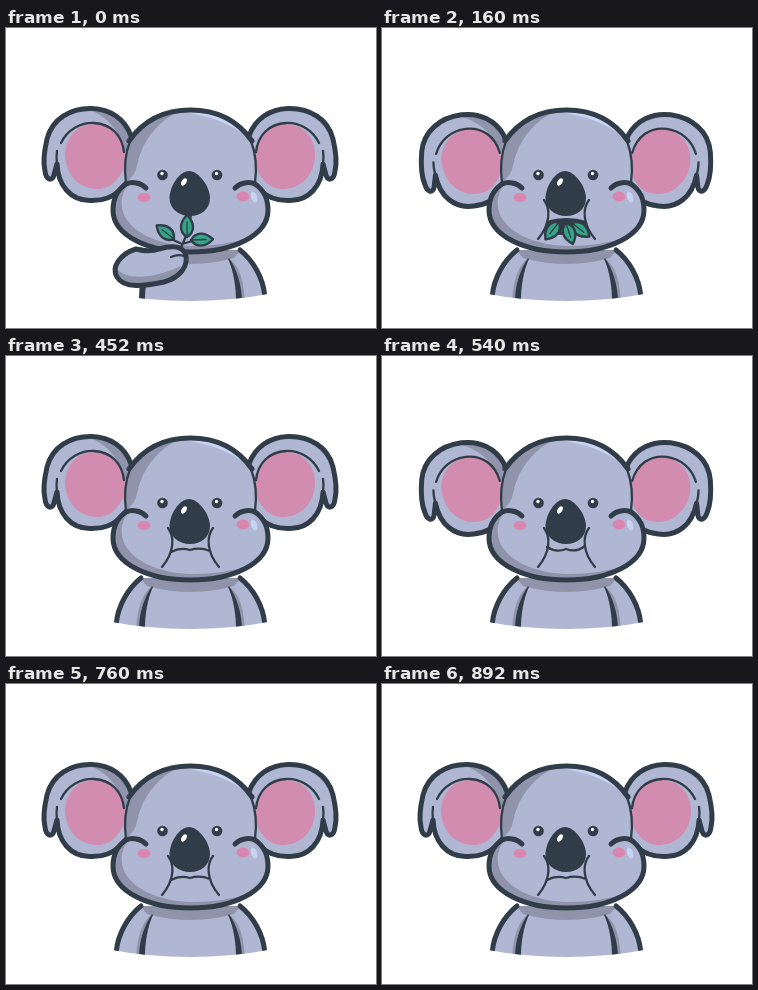
An HTML page that plays this animation: 370 by 300 pixels, repeating every 0.98 s.

```html
<!DOCTYPE html>
<html lang="en">
<head>
<meta charset="utf-8">
<title>Koala eating leaves</title>
<style>
  html, body { margin: 0; width: 100%; height: 100%; overflow: hidden; background: #fff; }
  svg { display: block; width: 370px; height: 300px; }
  .ink { fill: none; stroke: #303d48; stroke-width: 5; stroke-linecap: round; stroke-linejoin: round; }
  .thin { stroke-width: 2.3; }
  .vein { stroke-width: 1.3; }
  .fur { fill: #b0b7d3; }
  .shade { fill: #9094ab; }
  .shine { fill: #c8d2f2; }
  .pink { fill: #d28caf; }
  .blush { fill: #d987b0; }
  .dark { fill: #303d48; }
  .leaf { fill: #35a487; stroke: #303d48; stroke-width: 2.4; stroke-linejoin: round; }
</style>
</head>
<body>
<svg viewBox="0 0 370 300">
  <defs>
    <path id="head" d="M122 114C136 93 158 82 184.500 82C211 82 233 93 247 114C250 128 250 142 249 156C258 162 262 171 262 182C262 208 226 224 184.500 224C143 224 107 208 107 182C107 171 111 162 120 156C118 142 119 128 122 114Z"/>
    <path id="earShape" d="M125 108C119 91 104 81 86 80.500C64 80 46 91 41 111C38 124 37 135 39 143C40 152 46 154 48 147L51 136C52 158 65 172.500 84 172.500C97 173 107 169 114 162L130 145Z"/>
    <clipPath id="inHead"><use href="#head"/></clipPath>
    <clipPath id="bust"><path d="M100 200H268V265Q184 281 100 265Z"/></clipPath>
    <g id="earInside">
      <path class="pink" d="M59 126C60 108 72 96 88 96C105 96 116 107 119 124V138C112 153 104 161 91 161C72 161 59 145 59 126Z"/>
      <path class="ink thin" d="M55 115C61 102 74 94.500 88 95C105 96 116 107 118 124"/>
      <path class="ink thin" d="M51 136Q50 129 51 123"/>
      <use href="#earShape" class="ink"/>
    </g>
    <g id="leaf">
      <path class="leaf" d="M0 0C-8 -5 -8 -14 0 -22C8 -14 8 -5 0 0Z"/>
      <path class="ink vein" d="M0 0V-15"/>
    </g>
    <g id="arm">
      <path class="shade" d="M145 231C135 239 131 255 130 274H137Z"/>
      <path class="dark" d="M146 230C138 242 133 257 133 274H139C139 258 141 244 147 231Z"/>
      <path class="ink" d="M135 222C121 233 112 251 110.500 266"/>
    </g>
    <g id="headSide">
      <path class="ink thin" d="M124 113C119 126 118 140 120 155"/>
      <path class="ink" d="M140 160C135 155 126 153 120 156"/>
    </g>
    <path id="handShape" d="M130 221C114 226 105 239 111 249C118 261 139 258 158 254C173 250 184 238 179 225C175 217 164 218 153 221C145 224 137 223 130 221Z"/>
  </defs>

  <g clip-path="url(#bust)">
    <path class="fur" d="M135 222C121 233 112 251 110 278H259C257 251 248 233 234 222Z"/>
    <path class="shade" d="M134 222H235L228 230Q184 242 141 230Z"/>
    <use href="#arm"/>
    <use href="#arm" transform="matrix(-1 0 0 1 369 0)"/>
  </g>
  <path id="armGap" fill="#fff" d="M98 215H133V280H98Z"/>

  <g id="leftEar">
    <use href="#earShape" class="fur"/>
    <path class="shade" d="M84 82C102 82 117 91 125 108L119 126C116 108 105 90 84 82Z"/>
    <use href="#earInside"/>
  </g>
  <g transform="matrix(-1 0 0 1 368 0)">
    <g id="rightEar">
      <use href="#earShape" class="fur"/>
      <use href="#earInside"/>
    </g>
  </g>

  <use href="#head" class="fur"/>
  <g clip-path="url(#inHead)">
    <path class="shade" d="M110 150L123 156C114 166 113 180 121 192C133 209 158 217 185 218Q220 218 244 209L240 228H100V150Z"/>
    <path class="shade" d="M115 116C128 90 156 82 174 83C152 93 137 112 132 134Q129 149 121 153H114Z"/>
    <path class="shine" d="M176 84C205 80 232 92 247 114C230 98 208 88 176 84Z"/>
  </g>
  <use href="#headSide"/>
  <use href="#headSide" transform="matrix(-1 0 0 1 369 0)"/>
  <path class="ink" d="M123 113C137 93 158 82 184.500 82C211 82 232 93 246 113M249 156C258 162 262 171 262 182C262 208 226 224 184.500 224C143 224 107 208 107 182C107 171 111 162 120 156"/>

  <ellipse class="blush" cx="138" cy="169.500" rx="6.500" ry="4.500"/>
  <ellipse class="blush" cx="237" cy="168.500" rx="6.500" ry="5"/>
  <ellipse class="shine" cx="248" cy="169" rx="3" ry="5.500" transform="rotate(-20 248 169)"/>
  <circle class="dark" cx="156.500" cy="147" r="5.300"/><circle fill="#fff" cx="156" cy="145.500" r="1.700"/>
  <circle class="dark" cx="211" cy="147" r="5.300"/><circle fill="#fff" cx="210.500" cy="145.500" r="1.700"/>

  <path id="cheeks" class="ink thin" d="M162 172C169 181 168 197 156 211M207 172C200 181 201 197 213 211"/>
  <path id="flat" class="ink thin" d="M165 196Q174 191 184 194Q194 191 204 195"/>
  <path id="wavy" class="ink thin" d="M165 191Q174 197 184 193Q194 197 203 190"/>
  <g id="munch">
    <path class="dark" d="M164 193Q184 187 205 193L206 206Q184 208 162 206Z"/>
    <use href="#leaf" transform="translate(190 195) rotate(128)"/>
    <use href="#leaf" transform="translate(177 194) rotate(-142)"/>
    <use href="#leaf" transform="translate(184 195) rotate(162)"/>
  </g>

  <g id="hold">
    <path class="ink thin" d="M185 186L183 201L174 222M163 210L176 216L190 212"/>
    <use href="#leaf" transform="translate(168 211) rotate(-52)"/>
    <use href="#leaf" transform="translate(181 209)"/>
    <use href="#leaf" transform="translate(185 212) rotate(88)"/>
    <use href="#handShape" class="fur"/>
    <path class="shade" d="M110 240C119 252 145 252 175 238C170 250 160 254 143 256C125 259 110 255 110 240Z"/>
    <use href="#handShape" class="ink"/>
    <path class="ink thin" d="M165 229Q172 226 178 228"/>
  </g>
  <path class="dark" d="M183 143C193 143 204 159 204 170C204 181 195 188 184 188C172 188 163.500 180 163.500 170C163.500 159 173 143 183 143Z"/>
  <ellipse fill="#fff" cx="178" cy="154" rx="2.300" ry="4" transform="rotate(32 178 154)"/>
</svg>
<script>
  const LOOP = 980;
  const poses = [
    { until: 160, shows: ['hold', 'armGap'] },
    { until: 320, shows: ['cheeks', 'munch'], droop: true },
    { until: 540, shows: ['cheeks', 'flat'] },
    { until: 760, shows: ['cheeks', 'wavy'], droop: true },
    { until: LOOP, shows: ['cheeks', 'flat'] }
  ];
  const parts = ['hold', 'armGap', 'cheeks', 'munch', 'flat', 'wavy'];
  const byId = id => document.getElementById(id);
  const start = performance.now();

  function draw(now) {
    const t = Math.max(0, now - start) % LOOP;
    const pose = poses.find(p => t < p.until);
    for (const id of parts) byId(id).style.display = pose.shows.includes(id) ? '' : 'none';
    for (const id of ['leftEar', 'rightEar'])
      byId(id).setAttribute('transform', `rotate(${pose.droop ? -9 : 0} 123 126)`);
    requestAnimationFrame(draw);
  }
  draw(start);
</script>
</body>
</html>
```
